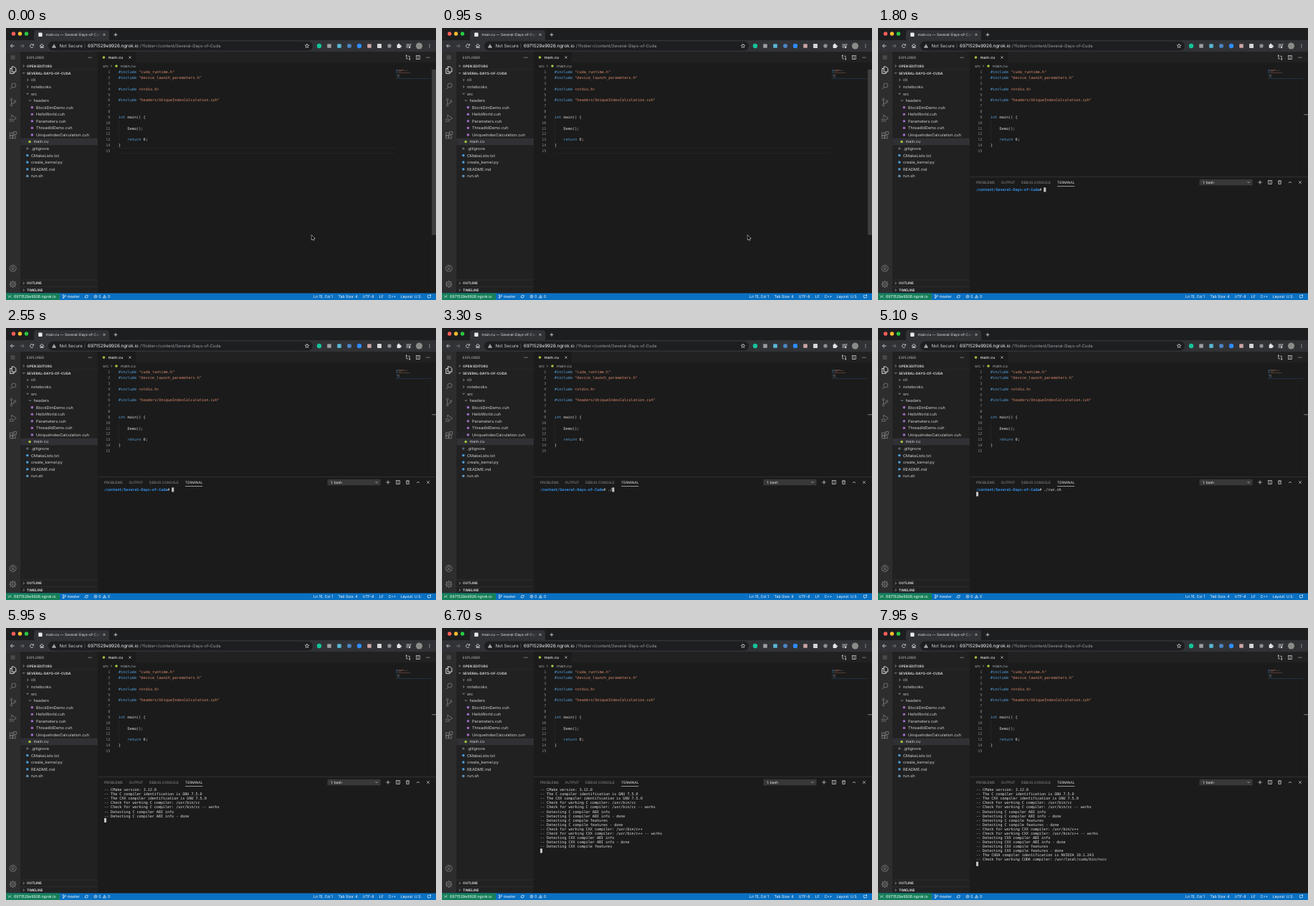
An HTML page with a canvas that plays this animation: 600x379 px, repeating every 8 s.

```html
<!DOCTYPE html>
<html lang="en">
<head>
<meta charset="utf-8">
<title>Terminal build</title>
<style>
html, body { margin: 0; width: 100%; height: 100%; overflow: hidden; background: #1b1b1b; }
canvas { display: block; width: 600px; height: 379px; }
</style>
</head>
<body>
<canvas id="stage"></canvas>
<script>
const W = 600, H = 379, LOOP = 8000;
const canvas = document.getElementById('stage');
const ratio = window.devicePixelRatio || 1;
canvas.width = Math.round(W * ratio);
canvas.height = Math.round(H * ratio);
const c = canvas.getContext('2d');
c.scale(ratio, ratio);

const SANS = 'Inter, "Open Sans", sans-serif';
const MONO = '"DejaVu Sans Mono", monospace';
const ROW = 9.56, LINE = 7.82, TERM_ROW = 6.08, TERM_COL = 3.04;
const EDITOR = '#1b1b1b', SIDE = '#212122', STRIP = '#1d1e20', TOOLBAR = '#313235';
const LIME = '#a3c644', PURPLE = '#9a6bbd', BLUE = '#4b9bd5';
const GREY = '#7e7e7e', LIGHT = '#d0d0d0';

// Times (ms) of the panel and terminal events
const PANEL_AT = 1300, PROMPT_AT = 1550, ENTER_AT = 4700, CLEAR_AT = 5400;
const KEYS = [[2950, '.'], [3200, './'], [3600, './r'], [3800, './ru'], [4150, './run.sh']];
const OUTPUT = [
  [5400, 'CMake version: 3.12.0'],
  [5500, 'The C compiler identification is GNU 7.5.0'],
  [5600, 'The CXX compiler identification is GNU 7.5.0'],
  [5650, 'Check for working C compiler: /usr/bin/cc'],
  [5800, 'Check for working C compiler: /usr/bin/cc -- works'],
  [5800, 'Detecting C compiler ABI info'],
  [5950, 'Detecting C compiler ABI info - done'],
  [6050, 'Detecting C compile features'],
  [6200, 'Detecting C compile features - done'],
  [6200, 'Check for working CXX compiler: /usr/bin/c++'],
  [6400, 'Check for working CXX compiler: /usr/bin/c++ -- works'],
  [6400, 'Detecting CXX compiler ABI info'],
  [6600, 'Detecting CXX compiler ABI info - done'],
  [6650, 'Detecting CXX compile features'],
  [6850, 'Detecting CXX compile features - done'],
  [7500, 'The CUDA compiler identification is NVIDIA 10.1.243'],
  [7550, 'Check for working CUDA compiler: /usr/local/cuda/bin/nvcc']
];

const KEY = '#55a3e0', STR = '#d98a6b', PLAIN = '#dadada';
const CODE = [
  [['#include ', KEY], ['"cuda_runtime.h"', STR]],
  [['#include ', KEY], ['"device_launch_parameters.h"', STR]],
  [],
  [['#include ', KEY], ['<stdio.h>', STR]],
  [],
  [['#include ', KEY], ['"headers/UniqueIndexCalculation.cuh"', STR]],
  [], [],
  [['int', KEY], [' main() {', PLAIN]],
  [],
  [['    Demo();', PLAIN]],
  [],
  [['    return', KEY], [' 0;', PLAIN]],
  [['}', PLAIN]],
  []
];

// Tree rows: name, depth, kind or icon colour
const TREE = [
  ['cli', 0, 'shut'], ['notebooks', 0, 'shut'], ['src', 0, 'open'], ['headers', 1, 'open'],
  ['BlockDimDemo.cuh', 2, PURPLE], ['HelloWorld.cuh', 2, PURPLE], ['Parameters.cuh', 2, PURPLE],
  ['ThreadIdDemo.cuh', 2, PURPLE], ['UniqueIndexCalculation.cuh', 2, PURPLE],
  ['main.cu', 1, LIME], ['.gitignore', 0, '#56636d'], ['CMakeLists.txt', 0, BLUE],
  ['create_kernel.py', 0, BLUE], ['README.md', 0, BLUE], ['run.sh', 0, '#5f93b5']
];

function box(x, y, w, h, color) {
  c.fillStyle = color;
  c.fillRect(x, y, w, h);
}

function round(x, y, w, h, r, color) {
  c.fillStyle = color;
  c.beginPath();
  c.roundRect(x, y, w, h, r);
  c.fill();
}

function dot(x, y, r, color) {
  c.fillStyle = color;
  c.beginPath();
  c.arc(x, y, r, 0, Math.PI * 2);
  c.fill();
}

function ring(x, y, r, color, w = 0.8, from = 0, to = Math.PI * 2) {
  c.strokeStyle = color;
  c.lineWidth = w;
  c.beginPath();
  c.arc(x, y, r, from, to);
  c.stroke();
}

// Open polyline through offsets around a centre
function line(x, y, pts, color, w = 0.8) {
  c.strokeStyle = color;
  c.lineWidth = w;
  c.beginPath();
  for (let i = 0; i < pts.length; i += 2) c.lineTo(x + pts[i], y + pts[i + 1]);
  c.stroke();
}

function frame(x, y, w, h, color, lw = 0.8) {
  c.strokeStyle = color;
  c.lineWidth = lw;
  c.strokeRect(x, y, w, h);
}

function text(s, x, cy, size, color, weight = 400, family = SANS, spacing = 0) {
  c.font = `${weight} ${size}px ${family}`;
  c.letterSpacing = spacing + 'px';
  c.textRendering = 'geometricPrecision';
  c.fillStyle = color;
  c.fillText(s, x, cy + size * 0.36);
}

const mono = (s, x, y, color) => text(s, x, y, 5.21, color, 400, MONO);
const term = (s, x, y, color, weight) => text(s, x, y, 5.21, color, weight, MONO, -0.097);

function cross(x, y, r, color, w = 0.7) {
  line(x, y, [-r, -r, r, r], color, w);
  line(x, y, [r, -r, -r, r], color, w);
}

function plus(x, y, r, color, w = 0.8) {
  line(x, y, [-r, 0, r, 0], color, w);
  line(x, y, [0, -r, 0, r], color, w);
}

function chevron(x, y, dir, color, r = 1.5) {
  const shapes = {
    right: [-r / 2, -r, r / 2, 0, -r / 2, r],
    down: [-r, -r / 2, 0, r / 2, r, -r / 2],
    up: [-r, r / 2, 0, -r / 2, r, r / 2]
  };
  line(x, y, shapes[dir], color, 0.75);
}

function split(x, y, color) {
  frame(x - 2.4, y - 2.4, 4.8, 4.8, color, 0.7);
  line(x, y, [0, -2.4, 0, 2.4], color, 0.7);
}

function dots(x, y, color, vertical) {
  for (let i = -1; i < 2; i++) dot(x + (vertical ? 0 : i * 1.9), y + (vertical ? i * 2 : 0), 0.6, color);
}

function browser() {
  box(0, 0, W, 17, STRIP);
  ['#ff5f57', '#febc2e', '#28c840'].forEach((color, i) => dot(10.5 + i * 9, 8, 2.7, color));
  round(39, 3, 105, 16, 3.5, TOOLBAR);
  box(0, 17, W, 16, TOOLBAR);
  round(45.2, 6.5, 5.4, 5.4, 1, '#e8eaed');
  const fade = c.createLinearGradient(122, 0, 132, 0);
  fade.addColorStop(0, '#dee1e6');
  fade.addColorStop(1, 'rgba(222,225,230,0)');
  text('main.cu — Several-Days-of-Cuda', 55.5, 9.3, 5, fade);
  cross(137, 9.3, 1.5, '#dee1e6');
  plus(153, 9.3, 2.4, '#dee1e6');

  const ink = '#e1e3e6', dim = '#7d8084';
  line(9, 25, [2.8, 0, -2.6, 0], ink);
  line(9, 25, [0, -2.6, -2.6, 0, 0, 2.6], ink);
  line(22.5, 25, [-2.8, 0, 2.6, 0], dim);
  line(22.5, 25, [0, -2.6, 2.6, 0, 0, 2.6], dim);
  ring(36, 25, 2.4, ink, 0.8, 0.5, 5.6);
  line(36, 25, [2.6, -2.8, 2.6, -0.8, 0.6, -0.8], ink);
  line(50, 25, [-3, 0, 0, -2.8, 3, 0], ink);
  line(50, 25, [-2, -0.6, -2, 2.5, -0.6, 2.5, -0.6, 0.6, 0.6, 0.6, 0.6, 2.5, 2, 2.5, 2, -0.6], ink);

  round(59, 18.6, 369, 12.8, 6.4, STRIP);
  c.fillStyle = '#c4c7ca';
  c.beginPath();
  c.moveTo(67, 22.3);
  c.lineTo(70, 27.5);
  c.lineTo(64, 27.5);
  c.fill();
  line(67, 25, [0, -1, 0, 1.4], STRIP, 0.6);
  text('Not Secure', 74.5, 25, 6.1, '#d0d3d6');
  box(109.7, 21.5, 0.6, 7, '#5f6368');
  text('6971529e9926.ngrok.io', 114, 25, 6.35, '#f1f3f4');
  text('/?folder=/content/Several-Days-of-Cuda', 186.8, 25, 5.85, '#9aa0a6');

  c.strokeStyle = ink;
  c.lineWidth = 0.65;
  c.beginPath();
  for (let i = 0; i < 10; i++) {
    const a = i * Math.PI / 5 - Math.PI / 2, r = i % 2 ? 1.3 : 3;
    c.lineTo(420 + Math.cos(a) * r, 25 + Math.sin(a) * r);
  }
  c.closePath();
  c.stroke();

  dot(437, 25, 3.2, '#15c39a');
  round(448.2, 22.2, 5.6, 5.6, 0.8, '#9b9da0');
  round(462.2, 22.2, 5.6, 5.6, 0.8, '#59b7d3');
  dot(479, 25, 3, '#4b83c3');
  dot(493, 25, 3.2, '#2d8cff');
  round(504.2, 22.2, 5.6, 5.6, 0.8, '#c9a5a5');
  round(518, 22, 6, 6, 0.8, '#d4d5d6');
  dot(535, 25, 2.7, '#8d9093');
  round(545.6, 23, 5, 5, 0.7, ink);
  dot(548, 22.7, 1.1, ink);
  dot(551, 25.5, 1.1, ink);
  for (let i = 0; i < 3; i++) line(561, 23 + i * 2, [-2.5, 0, i < 2 ? 2 : 0, 0], ink);
  line(564, 25, [0, 2, 0, -2.4, 1.4, -2.4], ink);
  dot(562.9, 27.2, 1.1, ink);
  dot(576.5, 25, 4.6, '#8a8b88');
  dots(591, 25, ink, true);
}

function activityBar() {
  box(0, 33, 20.5, 337, '#2d2d2d');
  for (let i = -1; i < 2; i++) line(9.5, 41 + i * 2, [-3, 0, 3, 0], GREY, 0.7);

  line(9.6, 58.7, [-1.4, -4.7, 1.8, -4.7, 4.2, -2.2, 4.2, 2.4, -1.4, 2.4, -1.4, -5], '#ffffff', 0.8);
  line(9.6, 58.7, [-1.4, -2.2, -4, -2.2, -4, 4.7, 1.6, 4.7, 1.6, 2.4], '#ffffff', 0.8);

  ring(10.8, 80, 3, GREY, 0.85);
  line(10.8, 80, [-2.1, 2.1, -5, 5.2], GREY, 0.9);

  ring(7.5, 99.5, 1.3, GREY);
  ring(7.5, 107.6, 1.3, GREY);
  ring(12.5, 102, 1.3, GREY);
  line(7.5, 103.6, [0, -2.8, 0, 2.6], GREY);
  line(7.5, 103.6, [5, -0.3, 4.1, 1.3, 0, 1.3], GREY);

  line(9.8, 126, [-2, -1.4, -2, -4.8, 4.5, -0.3, 0.5, 2.5], GREY, 0.85);
  ring(7.8, 128.4, 1.9, GREY, 0.85);
  line(7.8, 128.4, [-3.4, -1.6, -2, -0.6], GREY, 0.6);
  line(7.8, 128.4, [-3.4, 2.5, -1.7, 1.2], GREY, 0.6);
  line(7.8, 128.4, [3.1, 2.5, 1.7, 1.2], GREY, 0.6);

  frame(5.3, 146, 3.9, 3.9, GREY);
  frame(5.3, 149.9, 3.9, 3.9, GREY);
  frame(9.2, 149.9, 3.9, 3.9, GREY);
  frame(10.7, 144.4, 3.7, 3.7, GREY);

  ring(9.6, 335, 4.5, GREY, 0.85);
  ring(9.6, 333.7, 1.7, GREY, 0.8);
  ring(9.6, 339.3, 3, GREY, 0.8, Math.PI * 1.1, Math.PI * 1.9);

  ring(9.6, 357, 3.4, GREY, 0.9);
  ring(9.6, 357, 1.3, GREY, 0.8);
  for (let i = 0; i < 8; i++) {
    const a = i * Math.PI / 4, x = Math.cos(a), y = Math.sin(a);
    line(9.6, 357, [x * 3.4, y * 3.4, x * 4.9, y * 4.9], GREY, 1.2);
  }
}

function section(name, y, dir) {
  chevron(24.7, y, dir, LIGHT);
  text(name, 29, y, 4.78, LIGHT, 700);
}

function sidebar() {
  box(20.5, 33, 107.5, 337, SIDE);
  text('EXPLORER', 28.8, 41, 4.78, '#bbbbbb');
  dots(117, 41, LIGHT);
  section('OPEN EDITORS', 53, 'right');
  box(20.5, 57.7, 107.5, 0.4, '#333335');
  section('SEVERAL-DAYS-OF-CUDA', 62.8, 'down');
  TREE.forEach(([name, depth, kind], i) => {
    const y = 72.4 + i * ROW, x = 30.2 + depth * 3.3;
    if (name === 'main.cu') box(20.5, y - ROW / 2, 107.5, ROW, '#303035');
    if (kind === 'shut') chevron(x, y, 'right', LIGHT);
    else if (kind === 'open') chevron(x, y, 'down', LIGHT);
    else dot(x - 0.4, y, 1.8, kind);
    text(name, 35 + depth * 3.45, y, 5.6, LIGHT);
  });
  [['OUTLINE', 355.6], ['TIMELINE', 365.2]].forEach(([name, y]) => {
    box(20.5, y - ROW / 2, 107.5, 0.4, '#404042');
    section(name, y, 'right');
  });
}

function minimap() {
  c.globalAlpha = 0.55;
  CODE.forEach((parts, row) => {
    let x = 544;
    for (const [s, color] of parts) {
      const lead = s.length - s.trimStart().length;
      box(x + lead * 0.434, 58 + row * 0.87, s.trim().length * 0.434, 0.55, color);
      x += s.length * 0.434;
    }
  });
  c.globalAlpha = 1;
  box(544, 70, 49, 0.6, '#24405a');
}

function editor(panelOpen) {
  box(128, 33, 472, 337, EDITOR);
  box(128, 33, 472, 15.2, SIDE);
  box(128, 33, 53, 15.2, EDITOR);
  dot(136.5, 41, 1.8, LIME);
  text('main.cu', 142.4, 41, 5.6, '#ffffff');
  cross(173, 41, 1.6, LIGHT);

  line(561, 41, [-2.2, -2.5, -2.2, 1.8, 0, 1.8], LIGHT, 0.7);
  line(561, 41, [2.2, 2.5, 2.2, -1.8, 0, -1.8], LIGHT, 0.7);
  dot(558.8, 38.5, 0.9, LIGHT);
  dot(563.2, 43.5, 0.9, LIGHT);
  split(575, 41, LIGHT);
  dots(589, 41, LIGHT);

  text('src', 135, 53, 5.6, '#a9a9a9');
  chevron(147, 53, 'right', '#a9a9a9', 1.3);
  dot(154, 53, 1.8, LIME);
  text('main.cu', 160, 53, 5.6, '#a9a9a9');

  if (!panelOpen) {
    const lastY = 57.8 + 14 * LINE;
    box(156.5, lastY, 386.5, 0.5, '#2d2d2d');
    box(156.5, lastY + LINE - 0.5, 386.5, 0.5, '#2d2d2d');
  }
  box(157, 57.8 + 9 * LINE, 0.4, 4 * LINE, '#343434');
  CODE.forEach((parts, row) => {
    const y = 61.5 + row * LINE, n = String(row + 1);
    mono(n, 145.4 - n.length * 3.137, y, '#8a8a8a');
    let x = 157;
    for (const [s, color] of parts) {
      mono(s, x, y, color);
      x += s.length * 3.137;
    }
  });
  minimap();
  box(593.8, 57.8, 0.4, panelOpen ? 149 : 312, '#2b2b2b');
  if (panelOpen) box(594.2, 120.3, 5.8, 0.9, '#8a8a8a');
  else box(594.2, 57.8, 5.8, 230.5, '#3f3f3f');
}

function statusBar() {
  box(0, 369.5, W, 9.5, '#0a70c2');
  box(0, 369.5, 75, 9.5, '#17805a');
  const y = 374.2, ink = '#ffffff';
  line(5, y, [-1.9, -1.4, -0.3, 0.2, -1.9, 1.8], ink, 0.7);
  line(5, y, [2.1, -1.9, 0.5, -0.3, 2.1, 1.3], ink, 0.7);
  text('6971529e9926.ngrok.io', 11, y, 5.25, ink);
  ring(80, y - 1.8, 0.8, ink, 0.55);
  ring(80, y + 1.8, 0.8, ink, 0.55);
  ring(82.8, y - 1, 0.8, ink, 0.55);
  line(80, y, [0, -1, 0, 1], ink, 0.55);
  line(80, y, [2.8, -0.2, 2.2, 0.7, 0, 0.7], ink, 0.55);
  text('master', 85.8, y, 5.2, ink);
  ring(112.3, y, 1.9, ink, 0.65, 0.3, 2.8);
  ring(112.3, y, 1.9, ink, 0.65, 3.4, 5.9);
  line(112.3, y, [2.6, -1.6, 1.9, -0.3, 0.6, -0.8], ink, 0.6);
  line(112.3, y, [-2.6, 1.6, -1.9, 0.3, -0.6, 0.8], ink, 0.6);
  ring(125, y, 2, ink, 0.6);
  cross(125, y, 0.8, ink, 0.55);
  text('0', 129.3, y, 5.2, ink);
  line(137.5, y, [-2.1, 1.8, 0, -2, 2.1, 1.8, -2.3, 1.8], ink, 0.6);
  line(137.5, y, [0, -0.6, 0, 0.9], ink, 0.5);
  text('0', 142, y, 5.2, ink);
  [['Ln 15, Col 1', 429], ['Tab Size: 4', 463.5], ['UTF-8', 497.7], ['LF', 520.7], ['C++', 533.5],
    ['Layout: U.S.', 550.6]].forEach(([s, x]) => text(s, x, y, 5.2, ink));
  line(590.5, y, [0, -1.8, -2, -1.8, -2, 1.3, -1, 1.3, -1, 2.3, 0.2, 1.3, 2, 1.3, 2, 0], ink, 0.6);
  dot(592.1, y - 1.7, 0.9, ink);
}

function panel() {
  box(128, 207, 472, 162.5, EDITOR);
  box(128, 207, 472, 0.5, '#454545');
  const y = 215;
  [['PROBLEMS', 137], ['OUTPUT', 171.5], ['DEBUG CONSOLE', 200]].forEach(
    ([s, x]) => text(s, x, y, 4.78, '#969696'));
  text('TERMINAL', 250.2, y, 4.78, '#e7e7e7');
  box(250.2, 220.2, 24, 0.6, '#e7e7e7');
  box(448.5, 210.8, 74, 8.4, '#383838');
  text('1: bash', 453, y, 4.85, '#f0f0f0');
  chevron(517, y, 'down', LIGHT);
  plus(533, y, 2.6, LIGHT);
  split(547, y, LIGHT);
  line(560.5, y, [-2.6, -1.7, 2.6, -1.7], LIGHT, 0.7);
  line(560.5, y, [-0.9, -1.7, -0.9, -2.6, 0.9, -2.6, 0.9, -1.7], LIGHT, 0.6);
  line(560.5, y, [-1.9, -1.7, -1.7, 2.5, 1.7, 2.5, 1.9, -1.7], LIGHT, 0.7);
  line(560.5, y, [-0.6, -0.6, -0.6, 1.5], LIGHT, 0.4);
  line(560.5, y, [0.6, -0.6, 0.6, 1.5], LIGHT, 0.4);
  chevron(575, y, 'up', LIGHT, 2);
  cross(589, y, 1.9, LIGHT);
}

function terminal(t) {
  const x = 137, y = 225.3, ink = '#dadada';
  let col = 0, row = 0;
  if (t >= CLEAR_AT) {
    const lines = OUTPUT.filter(([at]) => t >= at);
    lines.forEach(([, s], i) => term('-- ' + s, x, y + i * TERM_ROW, ink));
    row = lines.length;
  } else if (t >= PROMPT_AT) {
    const typed = KEYS.reduce((s, [at, keys]) => t >= at ? keys : s, '');
    term('/content/Several-Days-of-Cuda', x, y, '#3593ec', 700);
    term('# ' + typed, x + 29 * TERM_COL, y, ink);
    if (t >= ENTER_AT) row = 1;
    else col = 31 + typed.length;
  }
  box(x + col * TERM_COL, y - 3 + row * TERM_ROW, TERM_COL, TERM_ROW, '#c4c4c4');
}

function pointer(x, y) {
  const pts = [0, 0, 0, 6.6, 1.5, 5.3, 2.5, 7.5, 3.5, 7, 2.5, 4.9, 4.6, 4.8, 0, 0];
  c.lineJoin = 'round';
  line(x, y, pts, '#ffffff', 1);
  c.fillStyle = '#000000';
  c.fill();
  c.lineJoin = 'miter';
}

function draw(t) {
  const open = t >= PANEL_AT;
  browser();
  activityBar();
  sidebar();
  editor(open);
  if (open) {
    panel();
    terminal(t);
  } else {
    pointer(426.4, 288.5);
  }
  statusBar();
}

const start = performance.now();
function tick() {
  draw((performance.now() - start) % LOOP);
  requestAnimationFrame(tick);
}
tick();
</script>
</body>
</html>
```
